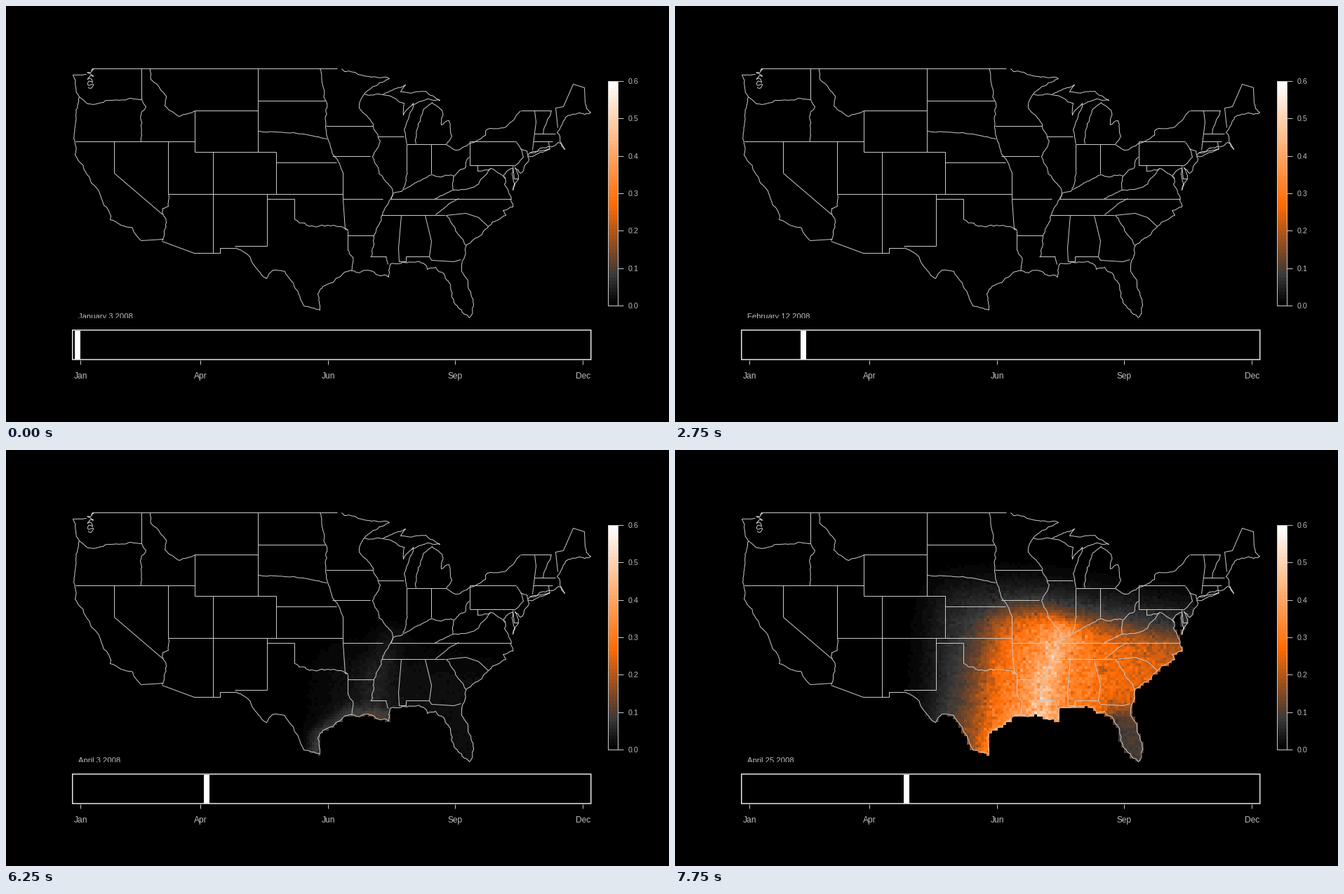
Recreate the animation shown at these times as a matplotlib script. Size 945 by 593 pixels, loop 8000 ms.

```python
import numpy as np
import matplotlib.pyplot as plt
from matplotlib.animation import FuncAnimation
from matplotlib.collections import LineCollection
from matplotlib.colors import LinearSegmentedColormap
from matplotlib.patches import Rectangle
from matplotlib.path import Path

W, H, DPI = 945, 593, 64
PX = 72 / DPI
FRAMES = 32
GREY = "#c8c8c8"
TEXT = "#bdbdbd"
rng = np.random.default_rng(8)

fig = plt.figure(figsize=(W / DPI, H / DPI), dpi=DPI, facecolor="black")
ax = fig.add_axes([0, 0, 1, 1])
ax.axis("off")

stops = [(0, "#000000"), (0.08, "#3b3b3b"), (0.1, "#533d30"), (0.2, "#b65818"),
         (0.27, "#ff6c05"), (0.4, "#ffa562"), (0.6, "#ffffff")]
cmap = LinearSegmentedColormap.from_list("heat", [(v / 0.6, c) for v, c in stops], N=64)

# ---- map lines ----
lines = []


def fractal(a, b, rough):
    """Points from a up to b, with midpoints displaced over and over."""
    d = b - a
    size = np.hypot(*d)
    if size < 4:
        return [a]
    shift = np.clip(rough * rng.normal(), -0.16, 0.16) * min(size, 16)
    mid = (a + b) / 2 + np.array([-d[1], d[0]]) / size * shift
    return fractal(a, mid, rough) + fractal(mid, b, rough)


def trace(*xy, rough=0.06):
    """Add a ragged coast or river through a few pixel positions."""
    keys = np.array(xy, float).reshape(-1, 2)
    pts = [p for a, b in zip(keys[:-1], keys[1:]) for p in fractal(a, b, rough)]
    pts = np.array(pts + [keys[-1]])
    lines.append(pts + 0.5)
    return pts


def straight(*xy):
    return trace(*xy, rough=0)


def px(west):
    return int(94.5 + (124.7 - west) * 12.83)


def py(north):
    return round(89 + (49 - north) * 14.9)


def parallel(north, west0, west1):
    straight(px(west0), py(north), px(west1), py(north))


def meridian(west, north0, north1):
    straight(px(west), py(north0), px(west), py(north1))


# surveyed borders, in degrees
parallel(49, 122.5, 95.2)
parallel(45.94, 104.05, 96.6)
parallel(45, 111.05, 104.05)
parallel(45, 74.8, 71.5)
parallel(43.5, 96.45, 91.3)
parallel(42.73, 73.3, 71)
parallel(42.5, 90.7, 87.85)
parallel(42.03, 73.5, 71.3)
parallel(42, 124.3, 111.05)
parallel(42, 80.5, 75.4)
parallel(41.75, 87.55, 83.15)
parallel(41, 111.05, 102.05)
parallel(40.6, 95.75, 91.6)
parallel(40, 102.05, 95.3)
parallel(39.72, 80.5, 75.6)
parallel(37, 114.05, 94.62)
parallel(36.55, 89.3, 75.9)
parallel(36.5, 103.04, 100)
parallel(36.5, 94.62, 90.2)
parallel(35, 90.3, 83.2)
parallel(33, 94.05, 91.2)
parallel(32, 106.6, 103.04)
parallel(31, 91.6, 89.8)
parallel(31, 87.6, 85)
meridian(120, 42, 39)
meridian(117, 49, 46.05)
meridian(114.05, 42, 37)
meridian(111.05, 45, 41)
meridian(109.05, 41, 31.33)
meridian(104.05, 49, 41)
meridian(103.04, 37, 32)
meridian(102.05, 41, 37)
meridian(100, 36.5, 34.55)
meridian(94.62, 39.1, 36.5)
meridian(94.05, 33.5, 31.6)
meridian(87.55, 41.75, 39.2)
meridian(84.8, 41.75, 38.9)
meridian(80.5, 42, 39.72)

# slanted borders, in pixels like everything below
straight(154, 238, 223, 297)
straight(480, 275, 483, 318, 487, 319)
straight(541, 357, 544, 368)
straight(563, 298, 559, 345, 560, 364, 570, 364, 570, 357)
straight(597, 298, 606, 335, 603, 357, 606, 362, 638, 364, 648, 361)
straight(627, 298, 655, 295, 673, 301, 687, 314)
straight(722, 228, 724, 246, 730, 246)
straight(753, 149, 755, 165, 750, 205)
straight(783, 145, 786, 173)
straight(773, 193, 774, 203)
straight(192, 334, 224, 332)
straight(222, 335, 268, 352, 305, 352, 305, 345, 327, 345)

# coasts and lakes
sound = np.linspace(0, 1, 34)
lines.append(np.column_stack([120 + 4 * np.sin(23 * sound) + rng.uniform(-1, 1, 34),
                              90 + 27 * sound + 2 * np.cos(40 * sound)]))
trace(114, 97, 95, 98, 104, 129, 97, 180, 98, 212, 124, 254, 147, 294,
      148, 304, 180, 316, 192, 334)
rio = trace(327, 344, 345, 355, 353, 369, 371, 388, 380, 376, 397, 378,
            411, 401, 424, 427, 447, 433)
gulf = trace(447, 433, 444, 410, 458, 396, 482, 379, 515, 376, 545, 386,
             548, 367, 594, 366, 600, 375, 612, 372, 633, 397, 638, 420,
             648, 432, 660, 444, rough=0.1)
east = trace(660, 444, 666, 425, 649, 370, 656, 340, 688, 313, 712, 298,
             708, 291, 722, 286, 716, 266, rough=0.08)
bay = trace(716, 266, 709, 240, 722, 231, 722, 262, 730, 246, 725, 230,
            733, 238, 745, 218, 742, 207, rough=0.1)
trace(743, 212, 775, 203, 752, 213, 743, 214)
north_east = trace(746, 209, 778, 200, 787, 194, 796, 204, 785, 180,
                   797, 158, 833, 151, 825, 138, rough=0.1)
maine = straight(825, 138, 824, 116, 808, 111, 794, 143, 783, 145)
lakes = trace(733, 149, 712, 172, 683, 178, 683, 184, 661, 195, 640, 205, 627, 197)
michigan = trace(627, 197, 635, 185, 631, 163, 620, 169, 621, 148, 607, 137,
                 594, 148, 586, 174, 584, 196, rough=0.09)
wisconsin = trace(571, 196, 567, 176, 580, 138, 566, 155, 567, 138, 537, 126)
trace(577, 141, 600, 132, 618, 134, 598, 121, 562, 122, 569, 112, 537, 126, 510, 125)
trace(478, 89, 482, 93, 520, 101, 546, 103, 510, 125)

# rivers and ridges
trace(104, 129, 116, 139, 145, 134, 193, 133)
trace(193, 133, 199, 143, 191, 158, 192, 193)
trace(205, 89, 206, 104, 228, 128, 226, 142, 247, 157, 269, 149)
trace(231, 268, 231, 285, 223, 288, 228, 308, 222, 334)
trace(411, 304, 440, 314, 475, 314, 487, 319, rough=0.1)
trace(447, 89, 455, 134, 457, 185, 467, 213, 480, 238)
trace(359, 178, 410, 180, 457, 189, rough=0.03)
trace(487, 347, 494, 358, 492, 377)
trace(510, 125, 503, 145, 523, 168, 533, 192, 522, 214, 537, 245, 551, 267,
      536, 297, 524, 327, 520, 357, rough=0.08)
trace(571, 235, 565, 260)
trace(551, 267, 575, 257, 606, 240, 638, 242, 655, 228, 660, 215, rough=0.09)
trace(548, 275, 551, 267)
trace(645, 274, 612, 297)
trace(611, 274, 637, 262, 636, 252, 638, 242)
trace(637, 262, 665, 258, 690, 231, 712, 245)
trace(672, 227, 672, 235, 690, 232)
trace(627, 298, 655, 341)
trace(727, 194, 733, 203, 743, 207)
trace(733, 203, 737, 215, 724, 228)
trace(777, 149, 765, 182)

ax.add_collection(LineCollection(lines, colors=GREY, linewidths=PX, zorder=3, snap=False))

# ---- heat field ----
CELL = 4
X0, X1, Y0, Y1 = 296, 740, 88, 448
gx, gy = np.meshgrid(np.arange(X0, X1, CELL) + CELL / 2,
                     np.arange(Y0, Y1, CELL) + CELL / 2)
inland = [(510, 125), (473, 89), (295, 89), (295, 345)]
land = Path(np.vstack([rio, gulf, east, bay, north_east, maine, lakes,
                       michigan, wisconsin, inland]))
mask = np.zeros(gx.shape, bool)
for dx in (-1.5, 0, 1.5):
    for dy in (-1.5, 0, 1.5):
        spots = np.column_stack([gx.ravel() + dx, gy.ravel() + dy])
        mask |= land.contains_points(spots).reshape(gx.shape)

grain = 1 + 0.09 * rng.standard_normal(gx.shape)
speckle = rng.random(gx.shape)


def edge(d, width=1.0):
    return 1 / (1 + np.exp(-np.clip(d / width, -30, 30)))


def near(path, width):
    """Glow that fades with distance from a polyline."""
    best = np.full(gx.shape, 1e9)
    for (x0, y0), (x1, y1) in zip(path[:-1], path[1:]):
        ux, uy = x1 - x0, y1 - y0
        t = np.clip(((gx - x0) * ux + (gy - y0) * uy) / (ux * ux + uy * uy), 0, 1)
        best = np.minimum(best, np.hypot(gx - x0 - t * ux, gy - y0 - t * uy))
    return np.exp(-(best / width) ** 2)


river = near([(548, 265), (524, 335), (522, 378)], 21)
shore = near([(441, 434), (445, 408), (490, 377), (550, 382)], 13)
upper_lakes = near([(540, 157), (607, 170)], 22)
lower_lakes = near([(545, 207), (665, 211)], 16)
florida = edge(gx - 612, 5) * edge(gy - 368, 7)
texas = edge(442 - gx, 13)
hole = near([(609, 313), (611, 313)], 5)
lag = np.maximum(gx - 520, 0)


def field(day):
    advance = np.clip((day - 91) / 22, 0, 1)
    # a faint grey front runs ahead of the warm one
    halo = 0.02 * edge(day - 73) + 0.052 * edge(day - 95)
    halo = (halo * edge(gx - 372 - 68 * (1 - advance) ** 4, 18)
            * edge(gy - 275 + 80 * advance ** 2 - 0.15 * lag, 17))
    west = 480 - 48 * advance ** 2 + 0.4 * (300 - gy)
    north = 290 - 58 * advance ** 2 + 0.2 * lag
    warm = 0.28 * edge(day - 104, 3.4) * edge(gx - west, 22) * edge(gy - north, 10)
    east_cut = 0.38 + 0.5 * edge(101 - day)
    warm = (warm * (1 - 0.65 * texas) * (1 - 0.88 * florida)
            * (1 - east_cut * edge(gx - 605, 25)))
    v = (halo + warm + 0.11 * edge(day - 98, 5) * river
         + 0.16 * np.exp(-((day - 101) / 10) ** 2) * shore)
    v = v * grain * (1 - 0.35 * hole)
    # scattered traces left over from winter
    winter = upper_lakes * 0.8 + lower_lakes * 0.7 * np.cos(np.pi * day / 58) ** 2
    v = np.maximum(v, 0.009 * (winter * edge(68 - day) > speckle))
    return np.where(mask, v, 0)


heat = ax.imshow(field(0), cmap=cmap, vmin=0, vmax=0.6, interpolation="nearest",
                 extent=(X0, X1, Y1, Y0), aspect="auto", zorder=1)


# ---- scales ----
def seg(x0, y0, x1, y1):
    ax.plot([x0 + 0.5, x1 + 0.5], [y0 + 0.5, y1 + 0.5], color=GREY, lw=PX,
            snap=False, solid_capstyle="butt", zorder=4)


def label(x, y, s, size, ha="left"):
    return ax.text(x, y, s, color=TEXT, fontsize=size * PX, ha=ha, va="baseline",
                   family="Liberation Sans", zorder=5)


ax.imshow(np.linspace(0.6, 0, 64)[:, None], cmap=cmap, vmin=0, vmax=0.6,
          interpolation="nearest", extent=(858, 872, 427, 107), aspect="auto", zorder=2)
ax.add_patch(Rectangle((858.5, 107.5), 14, 320, fill=False, ec=GREY, lw=PX,
                       snap=False, zorder=3))
for k in range(7):
    y = round(427 - k * 320 / 6)
    seg(872, y, 880, y)
    label(887, y + 4, f"{k / 10:.1f}", 10.7)

ax.add_patch(Rectangle((94.75, 462), 739, 42, fill=False, ec="#e6e6e6",
                       lw=1.5 * PX, snap=False, zorder=6))
for x, name in zip((106, 277, 459, 640, 822), ("Jan", "Apr", "Jun", "Sep", "Dec")):
    seg(x, 505, x, 511)
    label(x + 0.5, 531, name, 12, "center")

cursor = ax.add_patch(Rectangle((98, 463), 8, 41, fc="white", lw=0, zorder=5))
date = label(103, 446, "", 11.3)
# the caption is cut off along its lower edge
ax.add_patch(Rectangle((90, 445), 150, 15, fc="black", lw=0, zorder=6))
ax.set_xlim(0, W)
ax.set_ylim(H, 0)

MONTHS = [("January", 31), ("February", 29), ("March", 31), ("April", 30)]


def caption(day):
    n = day + 3
    for name, length in MONTHS:
        if n <= length:
            return f"{name} {n},2008"
        n -= length


def update(i):
    day = int(i * 3.65)
    heat.set_data(field(day))
    cursor.set_x(round(98.45 + day * 2.013))
    date.set_text(caption(day))
    return heat, cursor, date


anim = FuncAnimation(fig, update, frames=FRAMES, interval=250, repeat=True,
                     repeat_delay=0, blit=False)
plt.show()
```
